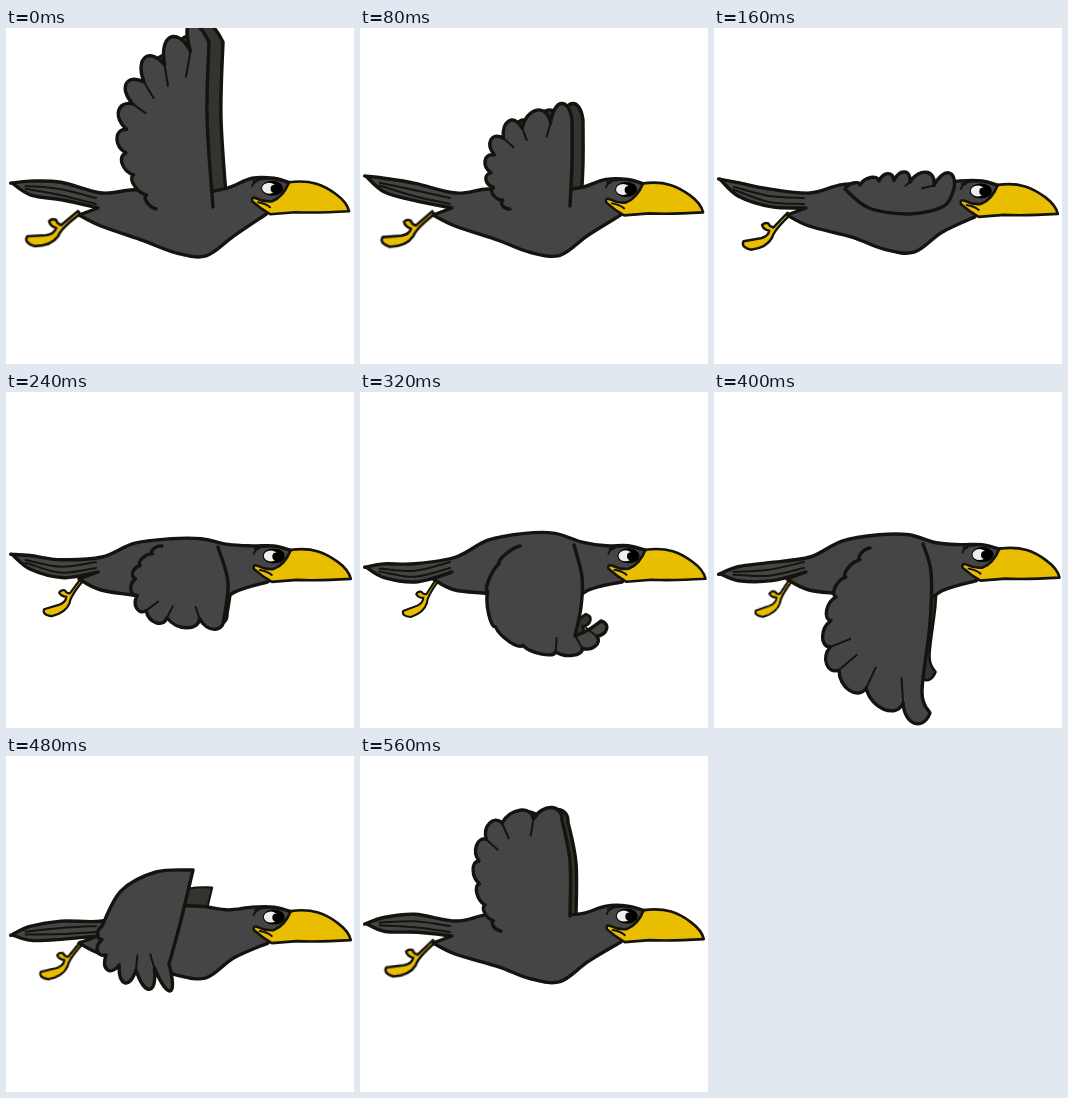
Write an HTML page that moves like this. It is 348 by 336 pixels and loops after 640 ms.

```html
<!DOCTYPE html>
<html lang="en">
<head>
<meta charset="utf-8">
<title>Flying bird</title>
<style>
  html, body { margin: 0; width: 100%; height: 100%; overflow: hidden; background: #fff; }
  svg { display: block; width: 348px; height: 336px; }
  .pose { opacity: 0; }
  path { fill: none; stroke: #15130d; stroke-width: 3.4; stroke-linecap: round; stroke-linejoin: round; }
  .body, .wing { fill: #464545; }
  .far { fill: #34332f; }
  .line { stroke-width: 2; }
  .foot, .beak { fill: #e9bd00; stroke-width: 2.6; }
</style>
</head>
<body>
<svg id="stage" viewBox="0 0 348 336"></svg>
<script>
const STEP = 80;

// trail: feathered edge from root to tip; lead: plain edge back to the body.
// side: +1 when the feathers point up, -1 when down; far: offset and scale of the other wing.
const wings = [
  { trail: "150,181 120,125 138,54 203,14", lead: "201,90 207,179", feathers: 9, depth: 24, side: 1, far: [14, 0, 1] },
  { trail: "150,181 131,150 148,106 212,92", lead: "212,135 210,178", feathers: 8, depth: 16, side: 1, far: [11, 0, 1] },
  { trail: "131,161 165,153 196,154 240,161", lead: "230,178 196,186 155,180 131,161", feathers: 6, depth: 13, side: 1, far: [0, 0, .5] },
  { trail: "156,154 130,182 145,222 218,226", lead: "222,190 212,155", feathers: 8, depth: 9, side: -1, far: [6, 2, .9] },
  { trail: "160,154 129,187 139,240 190,259 230,253 241,229", lead: "228,238 215,244 / 221,215 222,185 214,153", feathers: 8, depth: 5, side: -1, far: [-5, 6, .8] },
  { trail: "156,156 122,205 125,278 216,321", lead: "208,300 216,231 217,180 209,152", feathers: 9, depth: 13, side: -1, far: [12, -2, .75] },
  { trail: "96,170 100,199 130,214 163,208", lead: "174,168 187,114 / 150,116 115,135 96,170", feathers: 6, depth: 25, side: -1, far: [18, -3, .6] },
  { trail: "141,175 125,149 119,105 142,67 202,64", lead: "210,105 210,160", feathers: 8, depth: 10, side: 1, far: [6, 2, 1] }
];

const parse = text => text.split(" ").map(pair => pair.split(",").map(Number));
const wave = (pose, peak) => Math.cos(2 * Math.PI * (pose - peak) / wings.length);
const path = (name, d, extra = "") => `<path class="${name}" d="${d}" ${extra}/>`;

// Bezier handles of the smooth curve through points, for the span that starts at i.
function handles(points, i) {
  const a = points[i], b = points[i + 1];
  const before = points[i - 1] || a, after = points[i + 2] || b;
  return [a, a.map((v, k) => v + (b[k] - before[k]) / 6), b.map((v, k) => v - (after[k] - a[k]) / 6), b];
}

const spline = points => points.slice(1).map((_, i) => "C" + handles(points, i).slice(1).join(" ")).join("");

// Runs of points joined by corners.
function outline(runs) {
  let last = runs[0][0];
  return "M" + last + runs.map(run => {
    const d = spline([last, ...run]);
    last = run.at(-1);
    return d;
  }).join("");
}

function pointAt(points, t) {
  const position = t * (points.length - 1);
  const i = Math.min(Math.floor(position), points.length - 2), u = position - i, v = 1 - u;
  const [a, b, c, d] = handles(points, i);
  return a.map((_, k) => v ** 3 * a[k] + 3 * v * v * u * b[k] + 3 * v * u * u * c[k] + u ** 3 * d[k]);
}

function drawWing({ trail, lead, feathers, depth, side, far }) {
  const edge = parse(trail), runs = lead.split(" / ").map(parse);
  const all = [...edge, ...runs.flat()];
  const centre = [0, 1].map(k => all.reduce((sum, p) => sum + p[k], 0) / all.length);
  let d = "M" + edge[0], shafts = "";
  for (let i = 0; i < feathers; i++) {
    const t = (i + 1) / feathers;
    const a = pointAt(edge, i / feathers), b = pointAt(edge, t);
    const dx = b[0] - a[0], dy = b[1] - a[1];
    const height = (3 + depth * t ** 1.5) * 1.25 * side / Math.hypot(dx, dy);
    const nx = dy * height, ny = -dx * height;
    d += `C${a[0] + nx + dx * .3} ${a[1] + ny + dy * .3} ${b[0] + nx} ${b[1] + ny} ${b}`;
    if (t > .5 && t < 1) {
      shafts += `M${b}L${b.map((v, k) => v + (centre[k] - v) * .3)}`;
    }
  }
  let last = edge.at(-1);
  for (const run of runs) {
    d += spline([last, ...run]);
    last = run.at(-1);
  }
  const [x, y, scale] = far;
  return {
    near: path("wing", d) + path("line", shafts),
    far: path("far", d, `transform="translate(${190 + x} ${165 + y}) scale(${scale}) translate(-190 -165)"`)
  };
}

function drawBody(pose, [hx, hy]) {
  const sway = wave(pose, .3);
  const back = 153 + 12 * sway, chest = 223 + 5 * sway;
  const tip = [6, 165 - 17 * wave(pose, 1.2)];
  const tail = 172 - 9 * sway, bend = (tip[1] + tail) / 2;
  const body = outline([
    [tip, [24, bend - 6], [55, tail - 9], [96, 165], [128, 155 + 7 * sway], [165, back], [195, back],
      [222, 155 + 5 * sway], [246, 150 + hy], [268, 150 + hy], [285 + hx, 155 + hy]],
    [[260 + hx, 186 + hy]],
    [[228, chest - 20], [200, chest], [170, chest - 3], [138, chest - 15], [95, 198], [73, 187]],
    [[92, 180]],
    [[58, tail + 9], [25, bend + 8], tip]
  ]);
  const quills = [-2, 4].map(y => outline([[[22, bend + y / 2], [55, tail + y], [90, 172 + y]]])).join("");
  return path("body", body) + path("line", quills);
}

function drawFoot(pose) {
  const swing = 1 - wave(pose, .3);
  const place = `translate(${73 + 2 * swing} ${184 + 2 * swing}) rotate(${-9 * swing}) scale(${1 - .1 * swing})`;
  return path("foot", "M-1-1L-18 13Q-22 12-23 8Q-27 6-30 9Q-29 14-23 16Q-25 22-33 23L-52 24Q-56 30-45 34Q-28 34-21 24Q-18 16 1 2Z", `transform="${place}"`);
}

const drawHead = ([x, y]) => `<g transform="translate(${x} ${y})">
  ${path("beak", "M283 154C305 151 318 157 330 166Q341 174 343 183Q310 185 289 184L264 186Q255 181 246 173Q245 168 250 170Q258 174 266 173Q277 169 283 154Z")}
  ${path("line", "M252 174Q259 175 264 179M247 153Q263 147 283 155M246 158Q247 154 251 153")}
  <ellipse cx="266" cy="160" rx="11" ry="7.5"/>
  <ellipse cx="263" cy="160" rx="7" ry="5.5" fill="#eee"/>
  <circle cx="268.5" cy="160.500" r="4"/>
</g>`;

function drawPose(wing, pose) {
  const head = [1.3 - 1.3 * wave(pose, .5), 2 + 2 * wave(pose, 3.4)];
  const { near, far } = drawWing(wing);
  return `<g class="pose">${drawFoot(pose) + far + drawBody(pose, head) + near + drawHead(head)}</g>`;
}

const stage = document.getElementById("stage");
stage.innerHTML = wings.map(drawPose).join("");

[...stage.children].forEach((group, index) => {
  const steps = [...wings, null].map((_, i) => ({ opacity: i === index ? 1 : 0, easing: "step-end" }));
  group.animate(steps, { duration: STEP * wings.length, iterations: Infinity });
});
</script>
</body>
</html>
```
